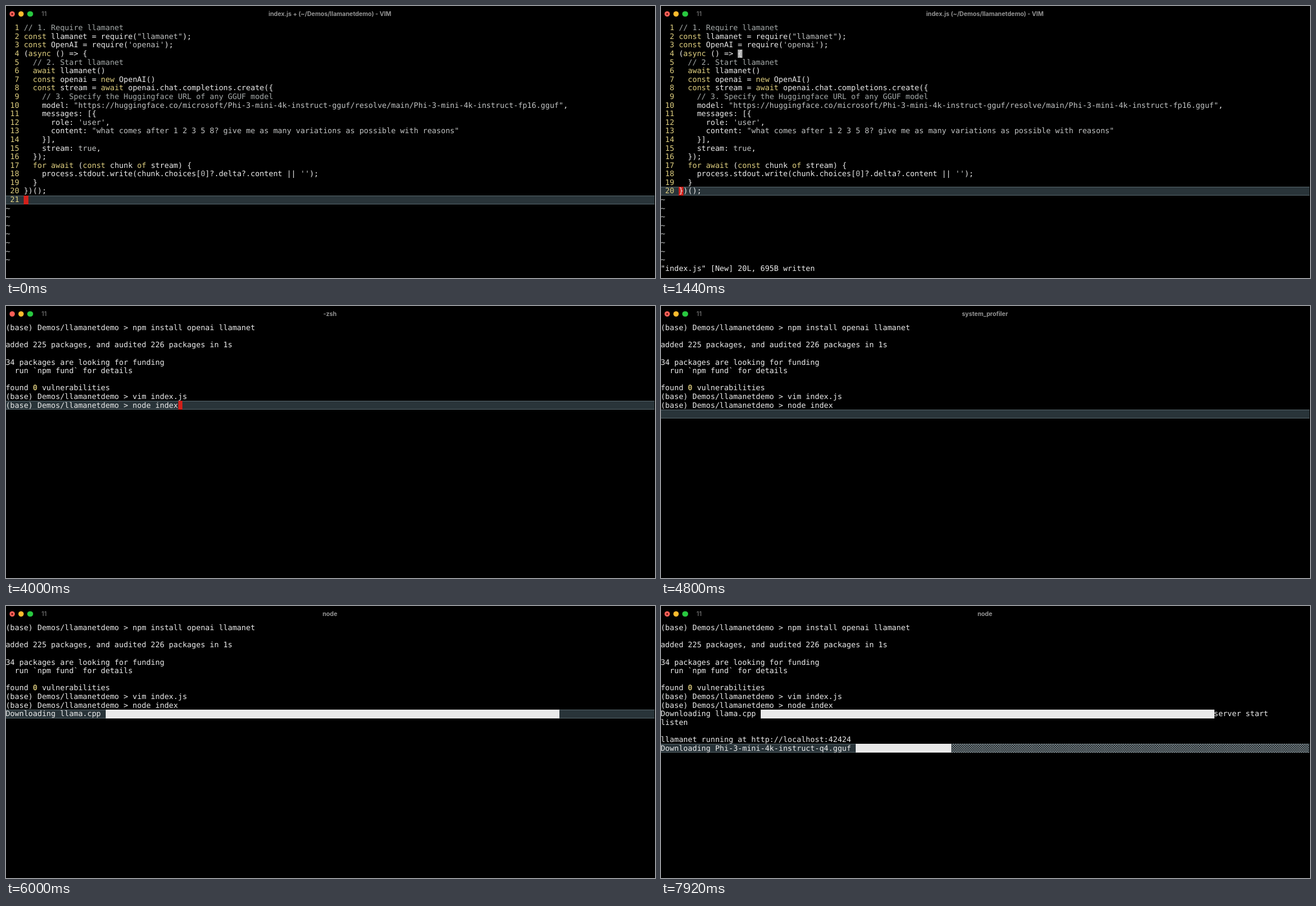
Write an HTML page that moves like this. It is 1100 px wide and 462 px high and loops after 8000 ms.

```html
<!DOCTYPE html>
<html lang="en">
<head>
<meta charset="utf-8">
<title>Terminal</title>
<style>
  html, body { margin: 0; width: 100%; height: 100%; overflow: hidden; background: #000; }
  #stage { position: relative; width: 1100px; height: 462px; overflow: hidden; background: #000; }
  #stage * { position: absolute; }
  #title, #tab { line-height: 27px; font-family: Inter, sans-serif; white-space: pre; }
  #title { left: 0; width: 1098px; text-align: center; font-weight: 700; font-size: 10.2px; color: #929292; }
  #tab { left: 60px; font-weight: 500; font-size: 11px; color: #6e6e6e; }
  .light { top: 8.7px; width: 9.4px; height: 9.4px; border-radius: 50%; }
  #busy { left: 9px; top: 11.9px; width: 3px; height: 3px; border-radius: 50%; background: #5c0a08; }
  #screen, #screen pre { left: 0; top: 0; margin: 0; }
  #screen { font: 12.773px/14.6px "DejaVu Sans Mono", monospace; color: #ececec;
            text-rendering: geometricPrecision; font-variant-ligatures: none; }
  #screen pre { left: -.6px; top: 31.2px; font: inherit; white-space: pre; }
  #screen pre * { position: static; font-weight: 400; }
  #screen pre b { color: #e0d080; }
  #screen pre b.zero { font-weight: 700; color: #cdbd74; }
  #screen pre i { color: #a6abab; font-style: normal; }
  #screen pre i.value { color: #c2c4c4; }
  .guide { left: 0; width: 1099px; height: 14.6px; background: #293439;
           box-shadow: inset 0 1px #55646a, inset 0 -1px #55646a; }
  .cell { height: 14.6px; }
</style>
</head>
<body>
<div id="stage">
  <div class="light" style="left:5.8px;background:#ff5f57"></div>
  <div id="busy"></div>
  <div class="light" style="left:21.1px;background:#febc2e"></div>
  <div class="light" style="left:36.4px;background:#28c840"></div>
  <div id="tab">11</div>
  <div id="title"></div>
  <div id="screen"></div>
</div>
<script>
const LOOP = 8000, STEP = 80, CELL = 7.69, ROW = 14.6, TOP = 30;
const RED = '#d2201a', GREY = '#a8a8a8', WHITE = '#e9e9e9';
const $ = id => document.getElementById(id);

const code = `// 1. Require llamanet
const llamanet = require("llamanet");
const OpenAI = require('openai');
(async () => {
  // 2. Start llamanet
  await llamanet()
  const openai = new OpenAI()
  const stream = await openai.chat.completions.create({
    // 3. Specify the Huggingface URL of any GGUF model
    model: "https://huggingface.co/microsoft/Phi-3-mini-4k-instruct-gguf/resolve/main/Phi-3-mini-4k-instruct-fp16.gguf",
    messages: [{
      role: 'user',
      content: "what comes after 1 2 3 5 8? give me as many variations as possible with reasons"
    }],
    stream: true,
  });
  for await (const chunk of stream) {
    process.stdout.write(chunk.choices[0]?.delta?.content || '');
  }
})();`.split('\n');

const prompt = '(base) Demos/llamanetdemo &gt; ';
const PROMPT_COLS = 28;
const shellTop = [
  prompt + 'npm install openai llamanet', '',
  'added 225 packages, and audited 226 packages in 1s', '',
  '34 packages are looking for funding',
  '  run `npm fund` for details', '',
  'found <b class="zero">0</b> vulnerabilities',
  prompt + 'vim index.js'
];
const command = 'node index';
const keyTimes = [2560, 2640, 2720, 2800, 2880, 3040, 3120, 3200, 3360, 3520];

const paint = line => line.replace(
  /(\/\/.*)|("[^"]*"|'[^']*'|\btrue\b|\b0\b)|\b(?:const|async|await|new|for|of)\b/g,
  (m, comment, value) =>
    comment ? `<i>${m}</i>` : value ? `<i class="value">${m}</i>` : `<b>${m}</b>`);

const box = (cls, row, style = '') =>
  `<div class="${cls}" style="top:${TOP + row * ROW}px;${style}"></div>`;
const guide = row => box('guide', row);
const cells = (col, row, count, color) =>
  box('cell', row, `left:${col * CELL - .6}px;width:${count * CELL}px;background:${color}`);
const text = lines => `<pre>${lines.join('\n')}</pre>`;

function editor(t) {
  const extra = t < 80;
  const lines = (extra ? [...code, ''] : code).map((line, i) =>
    `<b>${String(i + 1).padStart(3)}</b> ${paint(line)}`);
  while (lines.length < 28) lines.push('<i class="value">~</i>');

  let status = '';
  if (t >= 1120 && t < 1360) status = t < 1200 ? ':' : ':w';
  else if (t >= 1840) status = t < 1920 ? ':' : ':q';
  else if (t >= 1360) status = '"index.js" [New] 20L, 695B written';
  lines.push(status);

  const asking = status[0] === ':';
  const row = asking ? 28 : extra ? 20 : 19;
  let under = guide(row);
  if (!extra) under += cells(17, 3, 1, GREY);
  if (asking) under += cells(4, 19, 1, GREY);
  under += cells(asking ? status.length : 4, row, 1, RED);
  return under + text(lines);
}

// A labelled download bar, 100 cells wide
function progress(label, row, done) {
  const start = label.length + 1;
  return {
    line: label + ' '.repeat(done + 1) + '░'.repeat(100 - done),
    fill: cells(start, row, done, WHITE)
  };
}

function shell(t) {
  const typed = command.slice(0, keyTimes.filter(k => t >= k).length);
  const lines = [...shellTop, prompt + typed];
  if (t < 4080)
    return guide(9) + cells(PROMPT_COLS + typed.length, 9, 1, RED) + text(lines);

  const serving = t >= 6160, ready = t >= 6400;
  let under = guide(ready ? 14 : serving ? 12 : 10);
  if (t < 4480) under += cells(0, 10, 1, RED);
  if (t >= 4960) {
    const done = Math.min(100, Math.round((t - 4960) / 8));
    const bar = progress('Downloading llama.cpp', 10, done);
    under += bar.fill;
    lines.push(bar.line + (serving ? 'server start' : ''));
  }
  if (serving) lines.push('listen', '');
  if (ready) lines.push('llamanet running at http://localhost:42424');
  if (t >= 7120) {
    const bar = progress('Downloading Phi-3-mini-4k-instruct-q4.gguf', 14, 1 + (t - 7120) / 40);
    under += bar.fill;
    lines.push(bar.line);
  }
  return under + text(lines);
}

function titleAt(t) {
  if (t < 2080) return `index.js ${t < 1360 ? '+ ' : ''}(~/Demos/llamanetdemo) - VIM`;
  if (t < 2560) return 'vim';
  if (t < 4800) return '-zsh';
  return t < 4960 ? 'system_profiler' : 'node';
}

let last = -1;
function frame() {
  const t = Math.floor(performance.now() % LOOP / STEP) * STEP;
  if (t !== last) {
    last = t;
    const title = titleAt(t);
    $('title').textContent = title;
    $('busy').hidden = title === '-zsh';
    $('screen').innerHTML = t < 2080 ? editor(t) : shell(t);
  }
  requestAnimationFrame(frame);
}
frame();
</script>
</body>
</html>
```
